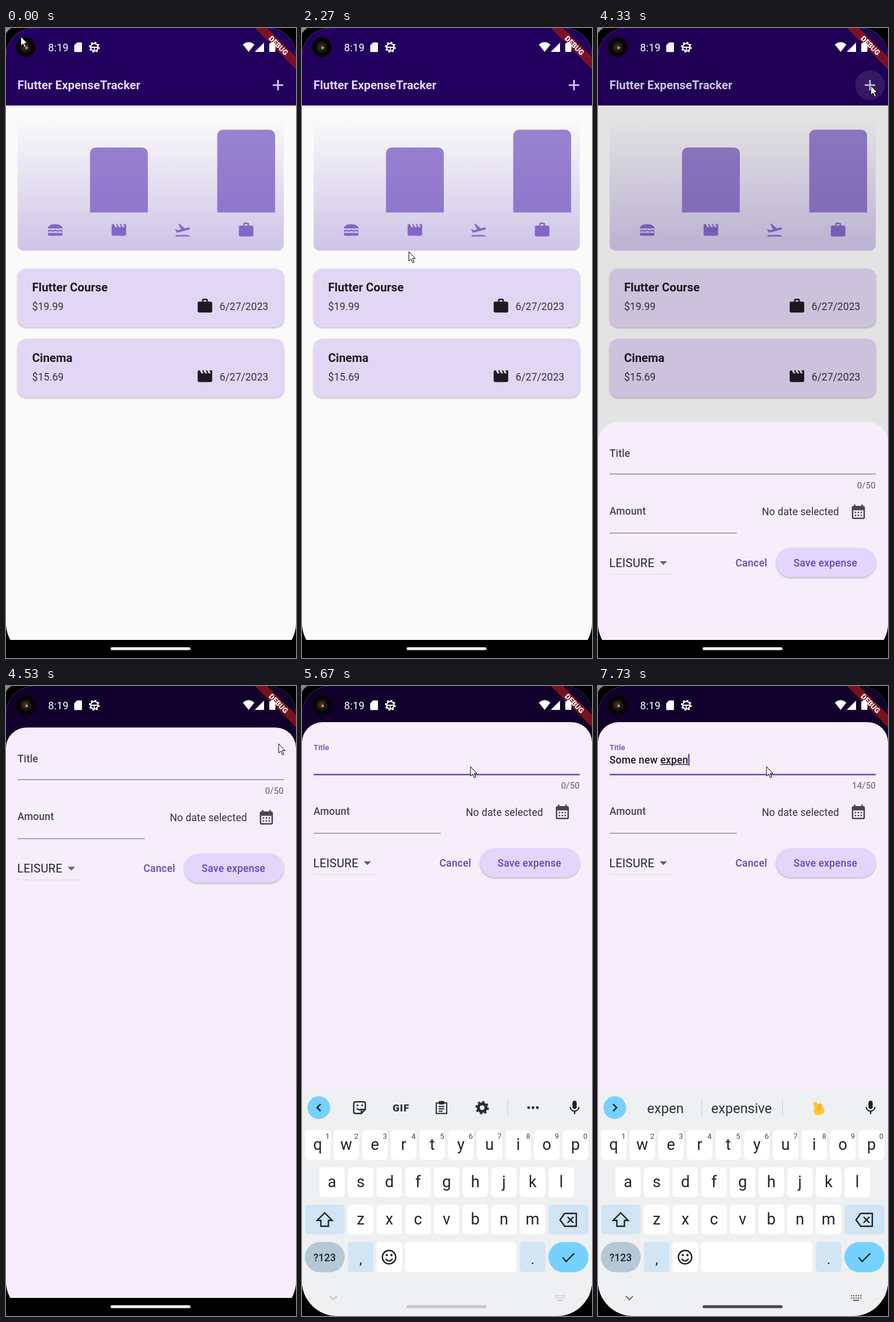
These frames come from a looping animation (499x1081 px, 8000 ms). An HTML page with a canvas:

```html
<!DOCTYPE html>
<html lang="en">
<head>
<meta charset="utf-8">
<title>Expense tracker</title>
<style>
  html, body { margin: 0; width: 100%; height: 100%; overflow: hidden; background: #000; }
  canvas { display: block; }
</style>
</head>
<body>
<canvas id="stage" width="499" height="1081"></canvas>
<script>
const W = 499, H = 1081, NAV_TOP = 1050, LOOP = 8000;
const PRIMARY = '#6846bc', INK = '#1d1b20', MUTED = '#49454f', ACCENT = '#75d1ff';
const c = document.getElementById('stage').getContext('2d');

// 24 x 24 icon outlines
const ICONS = {
  burger: 'M22 10c.3-3.3-4.3-6-10-6S1.7 6.7 2 10zM2 16h20v2c0 1.1-.9 2-2 2H4c-1.1 0-2-.9-2-2z',
  movie: 'M18 4l2 4h-3l-2-4h-2l2 4h-3l-2-4H8l2 4H7L5 4H4c-1.1 0-2 .9-2 2v12c0 1.1.9 2 2 2h16c1.1 0 2-.9 2-2V4z',
  flight: 'M2.5 19h19v2h-19zm19.57-9.36c-.21-.8-1.04-1.28-1.84-1.06L14.92 10l-6.9-6.43-1.93.51 4.14 7.17-4.97 1.33-1.97-1.54-1.45.39 2.59 4.49s7.12-1.9 16.57-4.43c.81-.23 1.28-1.05 1.07-1.85z',
  work: 'M20 6h-4V4c0-1.1-.9-2-2-2h-4c-1.1 0-2 .9-2 2v2H4c-1.1 0-2 .9-2 2v11c0 1.1.9 2 2 2h16c1.1 0 2-.9 2-2V8c0-1.1-.9-2-2-2zm-6 0h-4V4h4z',
  add: 'M19 13h-6v6h-2v-6H5v-2h6V5h2v6h6z',
  calendar: 'M19 4h-1V2h-2v2H8V2H6v2H5c-1.1 0-2 .9-2 2v14c0 1.1.9 2 2 2h14c1.1 0 2-.9 2-2V6c0-1.1-.9-2-2-2zm0 16H5V10h14zM7 12h2v2H7zm4 0h2v2h-2zm4 0h2v2h-2zM7 16h2v2H7zm4 0h2v2h-2zm4 0h2v2h-2z',
  dropDown: 'M7 10l5 5 5-5z',
  card: 'M18 2h-8L4 8v12c0 1.1.9 2 2 2h12c1.1 0 2-.9 2-2V4c0-1.1-.9-2-2-2z',
  mic: 'M12 14c1.7 0 3-1.3 3-3V5c0-1.7-1.3-3-3-3S9 3.3 9 5v6c0 1.7 1.3 3 3 3zm5.3-3c0 3-2.5 5.1-5.3 5.1S6.7 14 6.7 11H5c0 3.4 2.7 6.2 6 6.7V21h2v-3.3c3.3-.5 6-3.3 6-6.7z'
};
for (const name in ICONS) ICONS[name] = new Path2D(ICONS[name]);

const clamp = v => Math.max(0, Math.min(1, v));
const mix = (a, b, p) => a + (b - a) * p;
const progress = (t, start, end) => clamp((t - start) / (end - start));

function bezier(x1, y1, x2, y2, x) {
  const at = (a, b, s) => 3 * a * s * (1 - s) ** 2 + 3 * b * s * s * (1 - s) + s ** 3;
  let low = 0, high = 1;
  for (let i = 0; i < 20; i++) {
    const mid = (low + high) / 2;
    if (at(x1, x2, mid) < x) low = mid; else high = mid;
  }
  return at(y1, y2, low);
}

function box(x, y, w, h, r, color) {
  c.fillStyle = color;
  c.beginPath();
  c.roundRect(x, y, w, h, r);
  c.fill();
}

function shadowBox(x, y, w, h, r, color) {
  c.save();
  c.shadowColor = 'rgba(0,0,0,.28)';
  c.shadowBlur = 3;
  c.shadowOffsetY = 1.2;
  box(x, y, w, h, r, color);
  c.restore();
}

function disc(x, y, r, color) {
  c.fillStyle = color;
  c.beginPath();
  c.arc(x, y, r, 0, 7);
  c.fill();
}

function stroke(path, x, y, color, width = 2.4) {
  c.save();
  c.translate(x, y);
  c.strokeStyle = color;
  c.lineWidth = width;
  c.stroke(new Path2D(path));
  c.restore();
}

function icon(name, x, y, color, size = 30) {
  c.save();
  c.translate(x - size / 2, y - size / 2);
  c.scale(size / 24, size / 24);
  c.fillStyle = c.strokeStyle = color;
  c.fill(ICONS[name], 'evenodd');
  if (name === 'burger') {
    c.lineWidth = 2;
    c.stroke(new Path2D('M2 13.5c2 0 2-1 3.4-1s1.7 1 3.3 1 1.9-1 3.3-1 1.7 1 3.3 1 1.9-1 3.3-1 1.5 1 3.4 1'));
  }
  c.restore();
}

function gear(x, y, r, hole, color) {
  const rim = r * .8;
  c.save();
  c.strokeStyle = color;
  c.lineWidth = rim - hole;
  c.beginPath();
  c.arc(x, y, (rim + hole) / 2, 0, 7);
  c.stroke();
  c.lineWidth = r * .25;
  const step = Math.PI * r * .88 / 8;
  c.setLineDash([step, step]);
  c.beginPath();
  c.arc(x, y, r * .88, 0, Math.PI * 2);
  c.stroke();
  c.restore();
}

// y is the middle of the capital letters
function text(str, x, y, size, color, { weight = 400, align = 'left', spacing = 0 } = {}) {
  c.font = `${weight} ${size}px Roboto, sans-serif`;
  c.letterSpacing = spacing + 'px';
  c.textAlign = align;
  c.fillStyle = color;
  c.fillText(str, x, y + size * .355);
  return c.measureText(str).width;
}
const medium = { weight: 500, spacing: .15 };
const body = { spacing: .08 };

function expenseCard(y, title, price, symbol) {
  shadowBox(20, y, 458, 100.5, 15, '#e1d6f3');
  text(title, 45, y + 32, 20.3, INK, { weight: 700 });
  text(price, 45, y + 65, 17.5, '#36323c', body);
  icon(symbol, 342.3, y + 64, INK);
  text('6/27/2023', 367.5, y + 65, 17.5, '#36323c', body);
}

function homePage(t) {
  box(0, 0, W, NAV_TOP, 0, '#fafafa');
  box(0, 0, W, 133, 0, '#22005d');
  text('Flutter ExpenseTracker', 19.8, 98, 20.3, '#e4d8fb', { weight: 700 });
  if (t >= 4330) disc(468, 98, 25.5, 'rgba(255,255,255,.1)');
  icon('add', 468, 98, '#e4d8fb', 31);

  const shade = c.createLinearGradient(0, 153, 0, 382);
  shade.addColorStop(0, 'rgba(104,70,188,0)');
  shade.addColorStop(1, 'rgba(104,70,188,.3)');
  box(20, 153, 458, 229, 10, shade);
  for (const [x, y] of [[144.5, 205], [363.5, 174.5]])
    box(x, y, 99.5, 316.5 - y, [10, 10, 0, 0], 'rgba(104,70,188,.65)');
  ['burger', 'movie', 'flight', 'work'].forEach((name, i) =>
    icon(name, 84.7 + i * 109.5, 346.5, 'rgba(104,70,188,.75)'));

  expenseCard(413, 'Flutter Course', '$19.99', 'work');
  expenseCard(533.5, 'Cinema', '$15.69', 'movie');
}

const ENTRY = 'Some new expen';
const KEY_TIMES = [6130, 6270, 6330, 6400, 6530, 6670, 6800, 6930, 7000, 7130, 7330, 7470, 7600, 7730];
const HINTS = {
  S: ['S', 'So', 'See'], So: ['So', 'Some', 'Sorry'], Som: ['Som', 'Some', 'Something'],
  Some: ['Some', 'Someone', 'Something'], 'Some ': ['of', 'people', 'one'],
  n: ['n', 'new', 'not'], ne: ['ne', 'new', 'need'], new: ['new', 'news', 'newest'],
  'new ': ['one', 'and', 'year'], e: ['e', 'even', 'each'], ex: ['ex', 'extra', 'example'],
  exp: ['exp', 'expect', 'expert'], expe: ['expe', 'expect', 'expense'], expen: ['expen', 'expensive', '']
};

function sheet(t, typed) {
  const opening = clamp(.14 + (t - 4330) / 275);
  c.fillStyle = `rgba(0,0,0,${.54 * bezier(.25, .1, .25, 1, opening)})`;
  c.fillRect(0, 0, W, NAV_TOP);

  const top = mix(H, 62, bezier(0, 0, .2, 1, opening));
  c.save();
  c.translate(0, top);
  box(0, 0, W, NAV_TOP - top, [35, 35, 0, 0], '#f6eefb');

  const focused = t >= 5270, lift = progress(t, 5270, 5430);
  text('Title', 19.8, mix(53.5, 43.7, lift), 17.5 * mix(1, .75, lift), focused ? PRIMARY : MUTED, medium);
  if (focused) box(20, 88.7, 458, 2.5, 0, PRIMARY);
  else box(20, 88.8, 458, 1.25, 0, '#7f7986');

  const width = typed ? text(typed, 19.8, 65, 17.5, INK, medium) : 0;
  const wordStart = typed.lastIndexOf(' ') + 1;
  if (wordStart < typed.length) {
    const x = 19.8 + c.measureText(typed.slice(0, wordStart)).width;
    box(x, 72, 19.8 + width - x, 1.2, 0, INK);
  }
  if (focused && (typed || (t - 5200) % 1000 < 450)) box(19.8 + width, 54.5, 2.5, 20, 0, PRIMARY);
  text(typed.length + '/50', 478, 108.5, 15, '#5f5a66', { align: 'right', spacing: .2 });

  text('Amount', 19.8, 153, 17.5, MUTED, medium);
  box(20, 190, 218.5, 1.25, 0, '#7f7986');
  text('No date selected', 282, 154.3, 17.5, '#36323c', body);
  icon('calendar', 448, 154, MUTED);

  text('LEISURE', 19.2, 241.5, 20, '#26232b', { spacing: .25 });
  icon('dropDown', 112.5, 241.5, '#625d68');
  box(20, 261, 107.5, 1, 0, '#dfd8e4');
  text('Cancel', 236.5, 241.5, 17.5, PRIMARY, medium);
  shadowBox(306.5, 216.5, 171.5, 50, 25, '#e2d6fc');
  text('Save expense', 336.5, 241.5, 17.5, PRIMARY, medium);
  c.restore();
}

function fingerHeart(x, y) {
  c.save();
  c.translate(x, y);
  c.rotate(-.3);
  box(-9, -2, 18, 14, 6, '#fdc52f');
  box(-6, -12, 6.5, 16, 3, '#fdc52f');
  c.rotate(.5);
  box(-2, -8, 7, 12, 3, '#f9b51e');
  c.restore();
}

function toolbar(typed) {
  const dark = '#2b2e31';
  disc(29, 723.5, 19.5, ACCENT);
  stroke(typed ? 'M-3 -6l6 6l-6 6' : 'M3 -6l-6 6l6 6', 29, 723.5, dark, 2.6);
  icon('mic', 469, 723.5, '#202326', 29);
  if (!typed) {
    stroke('M10 3V-7q0-3-3-3H-7q-3 0-3 3V7q0 3 3 3H3zM10 3H6q-3 0-3 3v4M-5 1q4 5 8 1M-5-4h3M3-4h3', 99, 723.5, dark);
    text('GIF', 170.5, 723.5, 17, dark, { weight: 900, align: 'center', spacing: 1 });
    stroke('M-9 -8H9V10H-9zM-5 -2H5M-5 2H5M-5 6H2', 240, 723.5, dark, 2);
    box(235, 712, 10, 6, 2, dark);
    gear(310, 723.5, 11.5, 4, dark);
    box(353.5, 709, 1, 29, 0, '#c9cbce');
    for (const dx of [-7.5, 0, 7.5]) disc(397.5 + dx, 723.5, 2.4, dark);
    return;
  }
  const hints = HINTS[typed.match(/\S+ ?$/)[0]];
  [116, 247, 380].forEach((x, i) => text(hints[i], x, 724.5, i === 2 ? 22 : 23.5, '#2f3235', { align: 'center' }));
  if (!hints[2]) fingerHeart(379, 724);
  for (const x of [178, 317]) box(x, 709, 1, 29, 0, '#c9cbce');
}

function keyRow(letters, x, y, hints = '') {
  [...letters].forEach((letter, i) => {
    const left = x + i * 49.3;
    box(left, y, 43.8, 51, 6, '#fff');
    text(letter, left + 21.9, y + 24, 27, '#202326', { align: 'center' });
    if (hints) text(hints[i], left + 39, y + 10, 13, '#45484b', { align: 'center' });
  });
}

function keyboard(t, typed) {
  const blue = '#d2e5f5', dark = '#202326';
  c.save();
  c.translate(0, mix(390, 0, 1 - (1 - progress(t, 5300, 5600)) ** 3));
  box(0, 694, W, 400, 0, '#eff0f2');
  toolbar(typed);
  keyRow('qwertyuiop', 5, 762, '1234567890');
  keyRow('asdfghjkl', 29.8, 826);
  keyRow('zxcvbnm', 79, 890);

  box(5, 890, 68.5, 51, 6, blue);
  stroke('M0 -12L13 1H6.5V11H-6.5V1H-13z', 39, 916, dark);
  box(424, 890, 69, 51, 6, blue);
  stroke('M-6 -11H14V11H-6L-14 0zM-1 -5L9 5M9 -5L-1 5', 458, 916, dark);

  box(5, 954, 68.5, 52, 26, '#b4c8d5');
  text('?123', 39, 981, 17.5, dark, { weight: 500, align: 'center' });
  box(79, 954, 43.8, 52, 6, blue);
  text(',', 101, 983, 24, dark, { align: 'center' });
  box(128.3, 954, 43.8, 52, 6, '#fff');
  stroke('M11.5 0A11.5 11.5 0 1 1 -11.5 0A11.5 11.5 0 1 1 11.5 0M-6 3Q0 10 6 3', 149.8, 980, dark);
  for (const dx of [-4, 4]) disc(149.8 + dx, 976.5, 1.9, dark);
  box(177, 954, 192, 52, 6, '#fff');
  box(375, 954, 43.8, 52, 6, blue);
  text('.', 397, 983, 24, dark, { align: 'center' });
  box(424, 954, 69, 52, 26, ACCENT);
  stroke('M-10 0L-4 7L10 -7', 458.5, 980.5, dark);

  const tone = navTone(t, 110);
  stroke('M-6 -3L0 3L6 -3', 54, 1050, tone, 2);
  for (let i = 0; i < 10; i++) box(435 + i % 5 * 4, 1045 + Math.floor(i / 5) * 4, 2.3, 2.3, 0, tone);
  box(439, 1053, 10, 2.3, 0, tone);
  c.restore();
}

function navTone(t, dark) {
  const v = Math.round(mix(200, dark, progress(t, 5700, 6130)));
  return `rgb(${v},${v},${v + 2})`;
}

function debugBanner() {
  c.save();
  c.translate(W, 0);
  c.rotate(Math.PI / 4);
  c.shadowColor = 'rgba(0,0,0,.5)';
  c.shadowBlur = 6;
  box(-60, 35, 120, 15, 0, 'rgba(183,28,28,.627)');
  c.shadowColor = 'transparent';
  text('DEBUG', 0, 42.5, 12.75, '#fff', { weight: 900, align: 'center' });
  c.restore();
}

function statusBar() {
  disc(34, 33, 17, '#050505');
  disc(34, 33, 9.5, '#1c1716');
  disc(34, 33, 5, '#4a2d25');
  disc(35.5, 34, 2, '#d9a58f');
  text('8:19', 72.5, 33.5, 17.8, '#fff', { spacing: .2 });
  icon('card', 124, 33, '#fff', 20);
  gear(152, 33, 9.3, 5.4, '#fff');
  stroke('M-6 0H6M0 1V6', 152, 33, '#fff', 1.8);
  c.fillStyle = '#fff';
  c.fill(new Path2D('M407.5 28.5Q417.5 20 427.5 28.5L417.5 41zM444 25V41H428z'));
  box(453, 26, 10.5, 15, 1.5, '#fff');
  box(456, 24, 4.5, 3, 0, '#fff');
}

// time, x, y of the pointer tip
const POINTER = [
  [0, 25, 14], [70, 30, 30], [270, 140, 360], [470, 300, 610], [600, 345, 639], [870, 376, 250],
  [1000, 385, 250], [1200, 432, 241], [1400, 424, 220], [1530, 402, 228], [2000, 402, 228],
  [2300, 160, 400], [2530, 188, 432], [2600, 188, 443], [2930, 330, 300], [3200, 452, 160],
  [3330, 480, 130], [3470, 475, 121], [3730, 469, 98.5], [4530, 469, 98.5], [5000, 289.5, 138]
];

function pointer(t) {
  let i = POINTER.findIndex(stop => stop[0] > t);
  if (i < 0) i = POINTER.length;
  const from = POINTER[i - 1], to = POINTER[i] || from;
  const p = to === from ? 0 : progress(t, from[0], to[0]);
  c.save();
  c.translate(mix(from[1], to[1], p) + .5, mix(from[2], to[2], p) + .5);
  const arrow = new Path2D('M0 0V16L3.7 12.5L6.6 19L9 18L6.2 11.5H11z');
  c.fillStyle = '#fff';
  c.strokeStyle = '#000';
  c.lineWidth = 1;
  c.fill(arrow);
  c.stroke(arrow);
  c.restore();
}

function draw(t) {
  const typed = ENTRY.slice(0, KEY_TIMES.filter(time => time <= t).length);
  c.fillStyle = '#000';
  c.fillRect(0, 0, W, H);
  c.fillStyle = '#8c8c8c';
  c.fill(new Path2D('M0 0H10Q3 3 0 10z'));

  c.save();
  c.beginPath();
  c.roundRect(0, 0, W, H, [48, 48, 60, 60]);
  c.clip();
  homePage(t);
  if (t >= 4330) sheet(t, typed);
  debugBanner();
  box(0, NAV_TOP, W, 40, 0, '#000');
  if (t >= 5300) keyboard(t, typed);
  box(180, 1062.5, 137.5, 5, 2.5, t < 5400 ? '#f4f4f4' : navTone(t, 70));
  statusBar();
  c.restore();
  pointer(t);
}

const start = performance.now();
function tick() {
  draw((performance.now() - start) % LOOP);
  requestAnimationFrame(tick);
}
tick();
</script>
</body>
</html>
```
